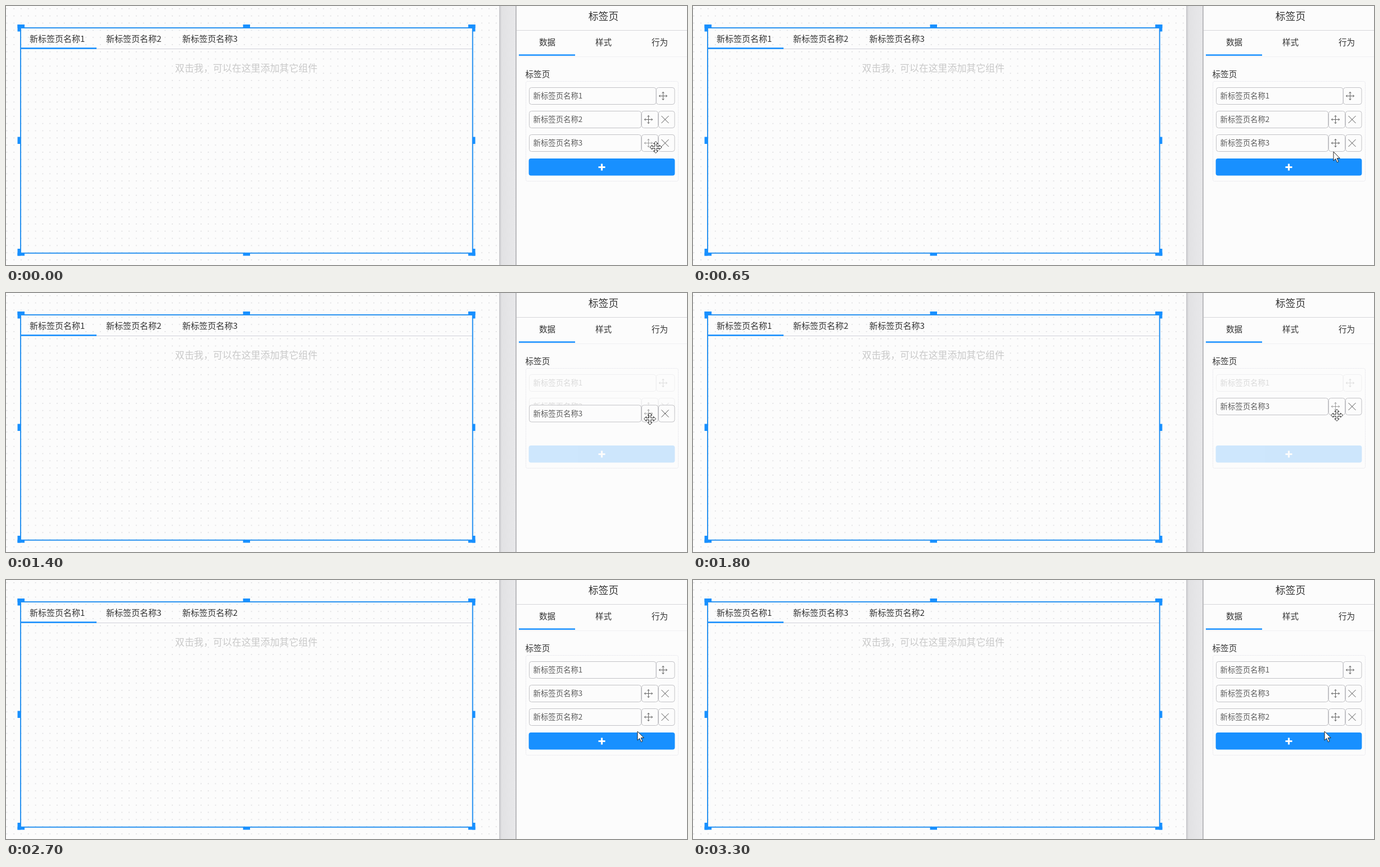
Recreate the animation shown at these times as an HTML page. Size 1211 by 462 pixels, loop 3.4 s.

```html
<!DOCTYPE html>
<html lang="zh-CN">
<head>
<meta charset="utf-8">
<title>标签页</title>
<style>
  html, body { margin: 0; width: 100%; height: 100%; overflow: hidden; background: #fcfcfc; }
  svg { display: block; width: 1211px; height: 462px; }
  text { font-family: "Noto Sans CJK SC", "Noto Sans CJK", sans-serif; fill: #333; }
  .tab { font-size: 15px; }
  .name { font-size: 13.4px; fill: #5c5c5c; }
  .head { font-size: 14.6px; }
  .box { fill: #fcfcfc; stroke: #c2c2c6; }
  .icon { fill: none; stroke: #666; stroke-width: 1; }
  .cross { stroke: #555; }
  .blue { fill: #1890ff; }
  .cursor { fill: #fff; stroke: #222; stroke-width: 1; }
</style>
</head>
<body>
<svg viewBox="0 0 1211 462">
  <defs>
    <pattern id="dots" x="0.5" y="4" width="12.8" height="12.8" patternUnits="userSpaceOnUse">
      <rect width="1.6" height="1.6" fill="#d8d8da"/>
    </pattern>
    <linearGradient id="edge">
      <stop offset="0" stop-color="#c4c4c8"/>
      <stop offset="0.15" stop-color="#e2e2e4"/>
      <stop offset="1" stop-color="#e8e8ea"/>
    </linearGradient>
    <path id="grip" d="M0-7V7M-7 0H7M-2-5L0-7.3 2-5M-2 5L0 7.3 2 5M-5-2L-7.3 0-5 2M5-2L7.3 0 5 2"/>
    <path id="cross" d="M-6.5-6.5L6.5 6.5M6.5-6.5L-6.5 6.5"/>
  </defs>

  <rect width="878" height="462" fill="url(#dots)"/>

  <path d="M27 76.5H829" stroke="#d0d0d8"/>
  <rect class="blue" x="26" y="74.2" width="135" height="2.6"/>
  <g id="tabs"></g>
  <text x="300.5" y="117" style="font-size:16.9px;fill:#c9c9c9">双击我，可以在这里添加其它组件</text>
  <rect x="26" y="39" width="803.8" height="401.8" fill="none" stroke="#2a93f0" stroke-width="2"/>
  <g id="handles" class="blue"></g>

  <rect x="877" width="30" height="462" fill="url(#edge)"/>
  <rect x="907" width="304" height="462" fill="#fcfcfc"/>
  <path d="M907 0V462" stroke="#a2a2a6" stroke-width="1.4"/>
  <path d="M908 43.5H1211" stroke="#d6d6da"/>
  <path d="M912 90.5H1211" stroke="#f0f0f2"/>
  <rect class="blue" x="912" y="86.3" width="100" height="2.5"/>
  <text x="1062.5" y="25" text-anchor="middle" style="font-size:17.8px">标签页</text>
  <text class="head" x="948" y="69.5">数据</text>
  <text class="head" x="1048" y="69.5">样式</text>
  <text class="head" x="1148" y="69.5">行为</text>
  <text class="head" x="923.5" y="127">标签页</text>
  <rect x="924.5" y="134.5" width="271" height="178" rx="3" fill="none" stroke="#e6e6ec" stroke-dasharray="2 1"/>

  <g id="add">
    <rect class="blue" x="929.6" y="272" width="259.8" height="30.5" rx="4"/>
    <path d="M1059.5 281.5V293.5M1053.5 287.5H1065.5" stroke="#fff" stroke-width="3.2"/>
  </g>
  <g id="rows"></g>
  <path id="pointer" class="cursor" d="M0 0V16L3.7 12.6 6.4 18.8 8.9 17.7 6.2 11.6H11.2Z"/>
  <path id="mover" class="cursor" d="M0-10.5L4-6.5H1.6V-1.6H6.5V-4L10.5 0 6.5 4V1.6H1.6V6.5H4L0 10.5-4 6.5H-1.6V1.6H-6.5V4L-10.5 0-6.5-4V-1.6H-1.6V-6.5H-4Z"/>
</svg>

<script>
const LOOP = 3400, STEP = 50, GRAB = 1150, DROP = 1950;
const SLOTS = [160.5, 202.5, 244.5];
const $ = id => document.getElementById(id);

// time, x, y
const CURSOR = [
  [0, 1155.5, 252], [100, 1155.5, 252], [600, 1139, 260], [750, 1139, 260],
  [1000, 1145, 253], [GRAB, 1145, 253], [1400, 1145, 224.5], [1600, 1145, 218],
  [DROP, 1145, 218], [2150, 1131, 258], [2400, 1123, 270]
];
// time, row offset
const DRAG = [[GRAB, 0], [1400, -29.5], [1600, -42]];

function sample(table, t) {
  const i = table.findIndex(k => k[0] > t);
  if (i < 0) return table[table.length - 1].slice(1);
  if (i === 0) return table[0].slice(1);
  const a = table[i - 1], b = table[i];
  const p = (t - a[0]) / (b[0] - a[0]);
  return a.slice(1).map((v, n) => v + (b[n + 1] - v) * p);
}

const title = n => '新标签页名称' + n;
const box = (x, w) => `<rect class="box" x="${x + .5}" y="-15" width="${w}" height="30" rx="4"/>`;
const icon = (id, x) => `<use href="#${id}" class="icon ${id}" x="${x}"/>`;

function rowMarkup(n) {
  const label = `<text class="name" x="937.5" y="4.6">${title(n)}</text>`;
  const parts = n === 1
    ? box(930, 225.5) + box(1156, 32.5) + icon('grip', 1168.5)
    : box(930, 199) + box(1130, 29) + box(1160, 28.5) + icon('grip', 1142.5) + icon('cross', 1172);
  return `<g>${parts}${label}</g>`;
}

$('rows').innerHTML = [1, 2, 3].map(rowMarkup).join('');
$('tabs').innerHTML = [42, 178, 313.5].map(x => `<text class="tab" x="${x}" y="63.7"></text>`).join('');
const rows = [...$('rows').children];
const tabs = [...$('tabs').children];

const rect = (x, y, w, h) => `<rect x="${x}" y="${y}" width="${w}" height="${h}"/>`;
$('handles').innerHTML =
  [20.5, 421.5, 822].map(x => rect(x, 33, 12.5, 6) + rect(x, 440, 12.5, 5.5)).join('') +
  [33, 233.5, 433].map(y => rect(20.5, y, 5.5, 12.5) + rect(829, y, 5.5, 12.5)).join('');

const place = (el, x, y) => el.setAttribute('transform', `translate(${x} ${y})`);

function draw(time) {
  const t = Math.floor(time % LOOP / STEP) * STEP;
  const dragging = t >= GRAB && t < DROP;
  const order = t < DROP ? [1, 2, 3] : [1, 3, 2];
  const [x, y] = sample(CURSOR, t);
  const hover = dragging || y < 259.5;

  order.forEach((n, slot) => {
    const row = rows[n - 1];
    const held = dragging && n === 3;
    place(row, 0, SLOTS[slot] + (held ? sample(DRAG, t)[0] : 0));
    row.setAttribute('opacity', dragging && !held ? .2 : 1);
    row.querySelector('.grip').setAttribute('opacity', hover && slot === 2 ? .6 : 1);
    tabs[slot].textContent = title(n);
  });
  $('add').setAttribute('opacity', dragging ? .2 : 1);

  place($('mover'), x, y);
  place($('pointer'), x, y);
  $('mover').setAttribute('visibility', hover ? 'visible' : 'hidden');
  $('pointer').setAttribute('visibility', hover ? 'hidden' : 'visible');
}

const start = performance.now();
function tick() {
  draw(performance.now() - start);
  requestAnimationFrame(tick);
}
tick();
</script>
</body>
</html>
```
